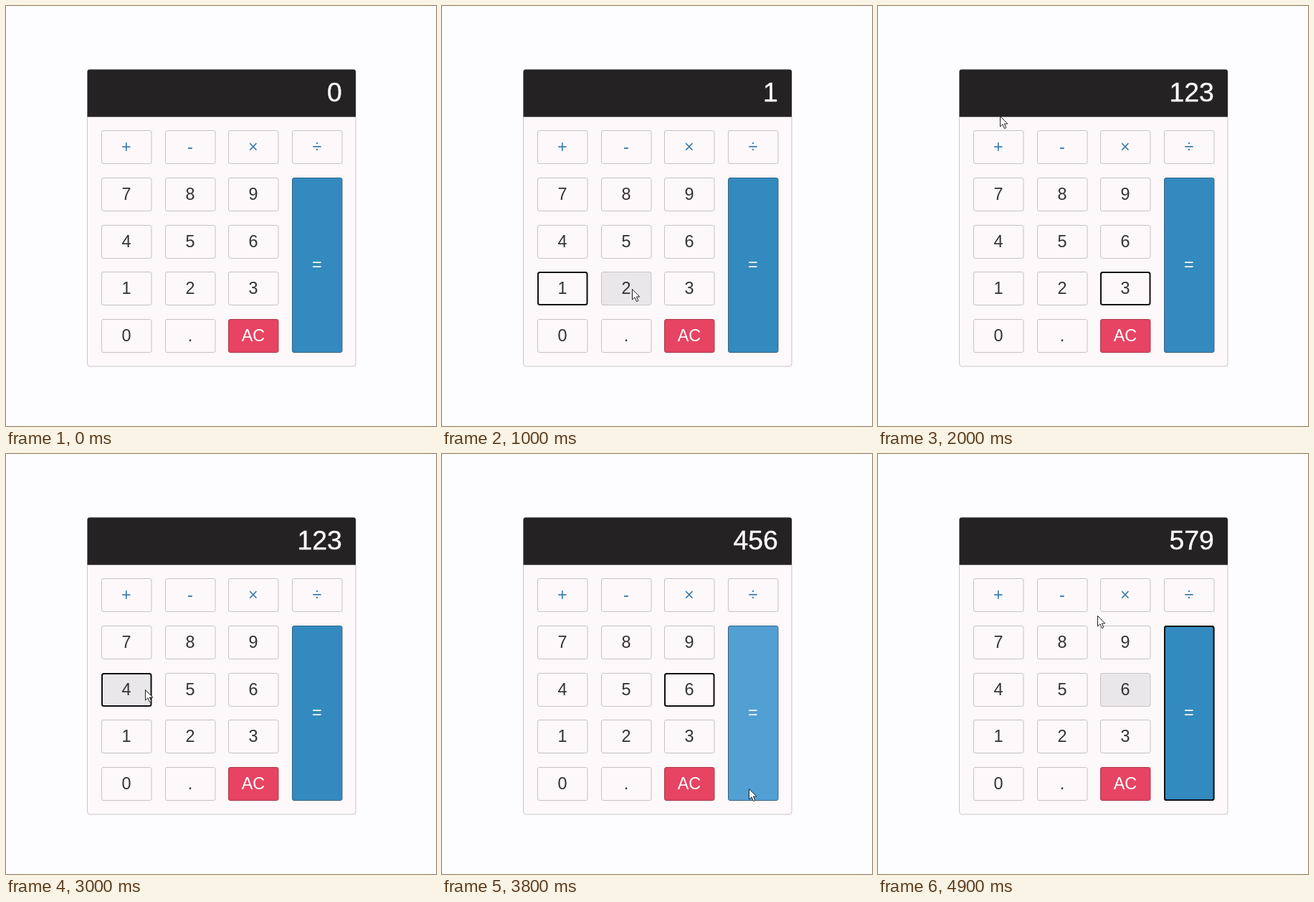
An HTML page for the animation above (5000 ms loop, 600 px wide and 585 px high).

```html
<!DOCTYPE html>
<html lang="en">
<head>
<meta charset="utf-8">
<title>Calculator</title>
<style>
  html, body { margin: 0; height: 100%; overflow: hidden; background: #fdfcfe; }
  svg { display: block; width: 600px; height: 585px; }
  text { font: 23.4px "Liberation Sans", Arial, sans-serif; text-anchor: middle; fill: #333; }
  #display { font-size: 37.4px; text-anchor: end; fill: #fff; stroke: #fff; stroke-width: .4; }
  .key rect { fill: #fdf8f9; stroke: #c6c3c6; }
  .key.hover rect { fill: #e9e7e9; }
  .operator text { fill: #3a7cab; }
  .equals text, .clear text { fill: #fff; }
  .equals rect { fill: #338abf; stroke: #3b6182; }
  .equals.hover rect { fill: #529fd4; }
  .clear rect { fill: #e64462; stroke: #a83a4c; }
  #ring { fill: none; stroke: #101014; stroke-width: 2; }
  #cursor { fill: #fff; stroke: #222; stroke-linejoin: round; }
</style>
</head>
<body>
<svg viewBox="0 0 600 585">
  <rect x="113.5" y="88.5" width="374.5" height="413.5" rx="4" fill="#fdf8f9" stroke="#c8c6c9"/>
  <path d="M113.5 154.5V91.5q0-3 3-3H485q3 0 3 3V154.5Z" fill="#252224"/>
  <text id="display" x="468.8" y="133.4"></text>
  <g id="keys"></g>
  <rect id="ring" rx="2.5"/>
  <path id="cursor" d="M.5 .5V15L4 11.8L6.4 17.6L8.8 16.6L6.4 11H10.8Z"/>
</svg>
<script>
const TICK = 100, LOOP = 5000;
const $ = id => document.getElementById(id);

function set(el, attrs) {
  for (const name in attrs) el.setAttribute(name, attrs[name]);
  return el;
}

function add(parent, tag, attrs) {
  const el = document.createElementNS('http://www.w3.org/2000/svg', tag);
  return set(parent.appendChild(el), attrs);
}

function addKey(label, col, row) {
  const x = 133.5 + Math.round(88.6 * col);
  const y = 173.5 + Math.round(65.75 * row);
  const width = 69.5;
  const height = label === '=' ? 243 : 46;
  const type = label === '=' ? 'equals' : label === 'AC' ? 'clear' : row ? '' : 'operator';
  const el = add($('keys'), 'g', { class: 'key ' + type });
  add(el, 'rect', { x, y, width, height, rx: 2.5 });
  add(el, 'text', { x: x + width / 2 - .3, y: y + height / 2 + 7.4 }).textContent = label;
  return { label, x, y, width, height, el };
}

const rows = ['+-×÷', '789=', '456', '123', ['0', '.', 'AC']];
const keys = rows.flatMap((labels, row) => [...labels].map((label, col) => addKey(label, col, row)));

// Pointer stops: arrival tick, departure tick, x, y, key clicked there
const stops = [
  [2, 2, 573, 386],
  [7, 8, 180, 394, '1'],
  [10, 12, 265, 394, '2'],
  [14, 16, 356, 395, '3'],
  [20, 20, 170, 153],
  [22, 25, 176, 200, '+'],
  [28, 30, 194, 328, '4'],
  [32, 33, 272, 326, '5'],
  [35, 36, 358, 320, '6'],
  [38, 41, 428, 466, '='],
  [43, 43, 405, 400],
  [44, 44, 367, 336],
  [47, 47, 344, 398],
  [48, 48, 325, 310],
  [49, 49, 306, 225]
];
const clicks = stops.filter(stop => stop[4]);
// A click shows two ticks after arrival, its result one tick later
const PRESS_DELAY = 2, RESULT_DELAY = 3;
const clickedBy = tick => clicks.filter(stop => stop[0] <= tick).map(stop => stop[4]);

const easeOut = u => 1 - (1 - u) ** 3;

function pointerAt(tick) {
  if (tick < stops[0][0]) return null;
  const next = stops.findIndex(stop => stop[1] >= tick);
  const [arrive, , x, y] = stops[next];
  if (tick >= arrive) return [x, y];
  const [, leave, fromX, fromY] = stops[next - 1];
  const k = easeOut((tick - leave) / (arrive - leave));
  return [fromX + (x - fromX) * k, fromY + (y - fromY) * k];
}

function contains(key, point) {
  if (!point) return false;
  const dx = point[0] - key.x, dy = point[1] - key.y;
  return dx >= 0 && dx <= key.width && dy >= 0 && dy <= key.height;
}

function calculate(labels) {
  let shown = '0', sum = 0, fresh = true;
  for (const label of labels) {
    const isDigit = /\d/.test(label);
    if (isDigit) shown = fresh ? label : shown + label;
    else shown = String(sum += Number(shown));
    fresh = !isDigit;
  }
  return shown;
}

function draw() {
  const tick = Math.floor(performance.now() % LOOP / TICK);
  const pointer = pointerAt(tick);
  // Hover trails the pointer by one tick
  const trail = pointerAt(tick - 1);
  for (const key of keys) key.el.classList.toggle('hover', contains(key, trail));

  $('display').textContent = calculate(clickedBy(tick - RESULT_DELAY));

  const focused = keys.find(key => key.label === clickedBy(tick - PRESS_DELAY).pop());
  $('ring').style.display = focused ? '' : 'none';
  if (focused) {
    const { x, y, width, height } = focused;
    set($('ring'), { x: x + .5, y: y + .5, width: width - 1, height: height - 1 });
  }

  $('cursor').style.display = pointer ? '' : 'none';
  if (pointer) set($('cursor'), { transform: `translate(${pointer.map(Math.round)})` });
  requestAnimationFrame(draw);
}
draw();
</script>
</body>
</html>
```
